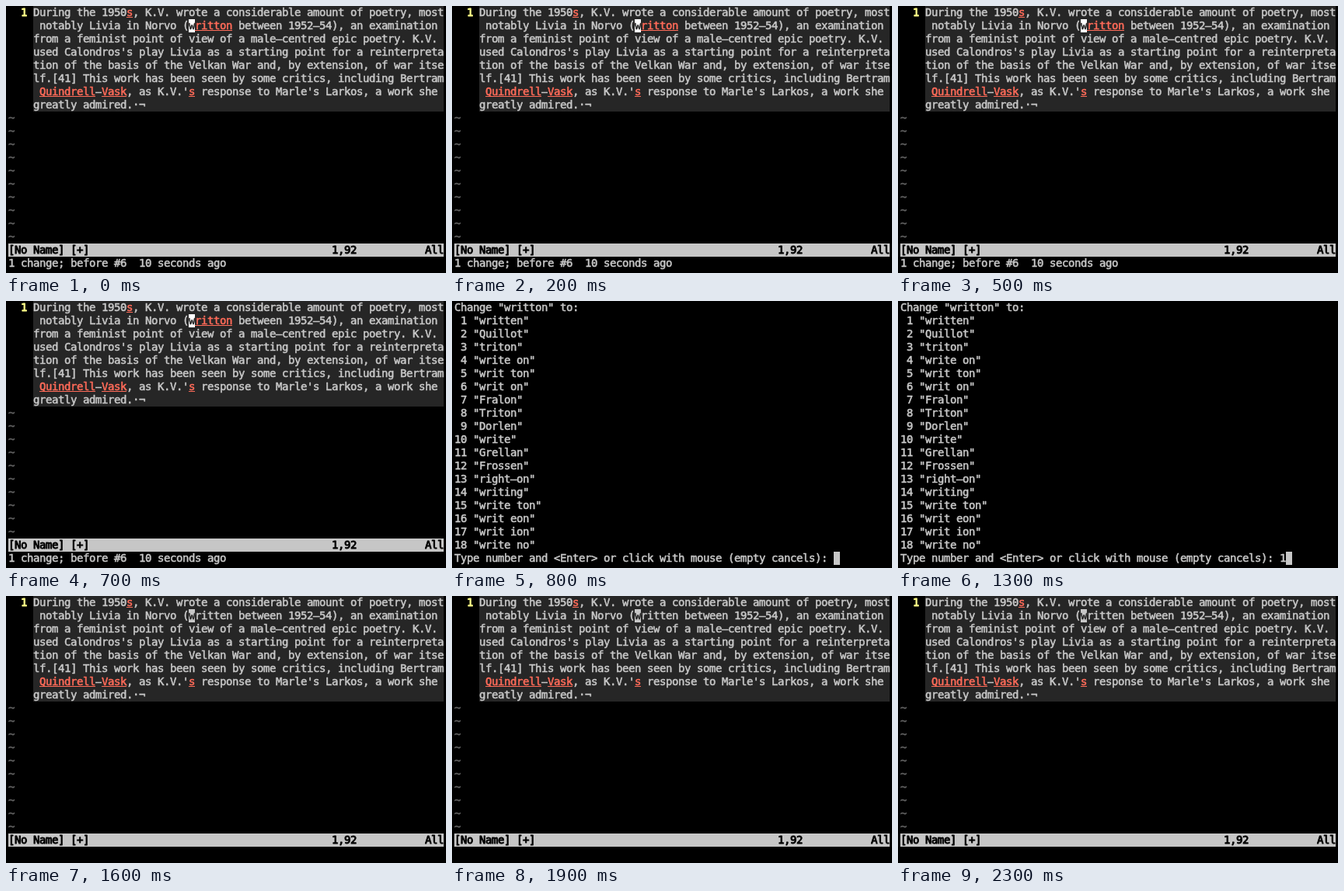
Write an HTML page with a canvas that moves like this. It is 566x344 px and loops after 2.4 s.

```html
<!DOCTYPE html>
<html lang="en">
<head>
<meta charset="utf-8">
<title>Spell suggestions in a terminal</title>
<style>
html, body { margin: 0; width: 100%; height: 100%; overflow: hidden; background: #000; }
canvas { display: block; width: 566px; height: 344px; }
</style>
</head>
<body>
<canvas id="stage" width="566" height="344"></canvas>
<script>
const ctx = document.getElementById('stage').getContext('2d');
const LOOP = 2400, MENU = 800, TYPED = 1300, FIXED = 1600;
const CELL = 8, ROW = 17, LEFT = 3, BASE = 13;
const COLS = 70, GUTTER = 4, STATUS = 18, LAST = 19;
const FONT = '14px "DejaVu Sans Mono", "Liberation Mono", monospace';
const MEDIUM = 0.55, BOLD = 0.9; // outline widths that thicken the glyphs
const INK = '#c7c7c7', BAD = '#ff6b59', LINE_BG = '#262626';
const TILDE = '#626262', NUMBER = '#ffff87', BAR = '#c6c6c6';

const paragraph = [
  'During the 1950s, K.V. wrote a considerable amount of poetry, most',
  ' notably Livia in Norvo (writton between 1952–54), an examination',
  'from a feminist point of view of a male–centred epic poetry. K.V.',
  "used Calondros's play Livia as a starting point for a reinterpreta",
  'tion of the basis of the Velkan War and, by extension, of war itse',
  'lf.[41] This work has been seen by some critics, including Bertram',
  " Quindrell–Vask, as K.V.'s response to Marle's Larkos, a work she",
  'greatly admired.·¬'
];
// row, column and length of each misspelling
const misspelled = [[0, 15, 1], [6, 1, 9], [6, 11, 4], [6, 25, 1]];
const typo = [1, 25, 7];

const suggestions = [
  'written', 'Quillot', 'triton', 'write on', 'writ ton', 'writ on',
  'Fralon', 'Triton', 'Dorlen', 'write', 'Grellan', 'Frossen',
  'right–on', 'writing', 'write ton', 'writ eon', 'writ ion', 'write no'
];
const prompt = 'Type number and <Enter> or click with mouse (empty cancels): ';

function fill(row, col, cols, color, rows = 1) {
  ctx.fillStyle = color;
  ctx.fillRect(LEFT + col * CELL, row * ROW, cols * CELL, rows * ROW);
}

function print(row, col, text, color = INK, weight = MEDIUM) {
  ctx.font = FONT;
  ctx.lineJoin = 'round';
  ctx.lineWidth = weight;
  ctx.fillStyle = ctx.strokeStyle = color;
  const y = row * ROW + BASE;
  [...text].forEach((ch, i) => {
    const x = LEFT + (col + i) * CELL;
    ctx.fillText(ch, x, y);
    ctx.strokeText(ch, x, y);
  });
}

function markBad([row, col, length]) {
  const start = GUTTER + col;
  fill(row, start, length, LINE_BG);
  print(row, start, paragraph[row].substr(col, length), BAD);
  ctx.fillRect(LEFT + start * CELL, row * ROW + BASE + 1, length * CELL, 1);
}

function drawEditor(fixed) {
  fill(0, GUTTER, COLS - GUTTER, LINE_BG, paragraph.length);
  print(0, 2, '1', NUMBER, BOLD);
  paragraph.forEach((line, row) => {
    print(row, GUTTER, fixed ? line.replace('writton', 'written') : line);
  });
  misspelled.forEach(markBad);
  if (!fixed) markBad(typo);

  const cursor = GUTTER + typo[1];
  fill(typo[0], cursor, 1, fixed ? INK : '#fff');
  print(typo[0], cursor, 'w', LINE_BG);

  for (let row = paragraph.length; row < STATUS; row++) print(row, 0, '~', TILDE);
  fill(STATUS, 0, COLS, BAR);
  print(STATUS, 0, '[No Name] [+]', '#000', BOLD);
  print(STATUS, 52, '1,92', '#000', BOLD);
  print(STATUS, 67, 'All', '#000', BOLD);
  if (!fixed) print(LAST, 0, '1 change; before #6  10 seconds ago');
}

function drawMenu(answer) {
  print(0, 0, 'Change "writton" to:');
  suggestions.forEach((word, i) => {
    print(i + 1, 0, `${String(i + 1).padStart(2)} "${word}"`);
  });
  const line = prompt + answer;
  print(LAST, 0, line);
  fill(LAST, line.length, 1, INK);
}

function draw(now) {
  const t = now % LOOP;
  ctx.fillStyle = '#000';
  ctx.fillRect(0, 0, 566, 344);
  if (t >= MENU && t < FIXED) drawMenu(t < TYPED ? '' : '1');
  else drawEditor(t >= FIXED);
}

let start;
function tick(now) {
  start ??= now;
  draw(now - start);
  requestAnimationFrame(tick);
}
draw(0);
requestAnimationFrame(tick);
</script>
</body>
</html>
```
